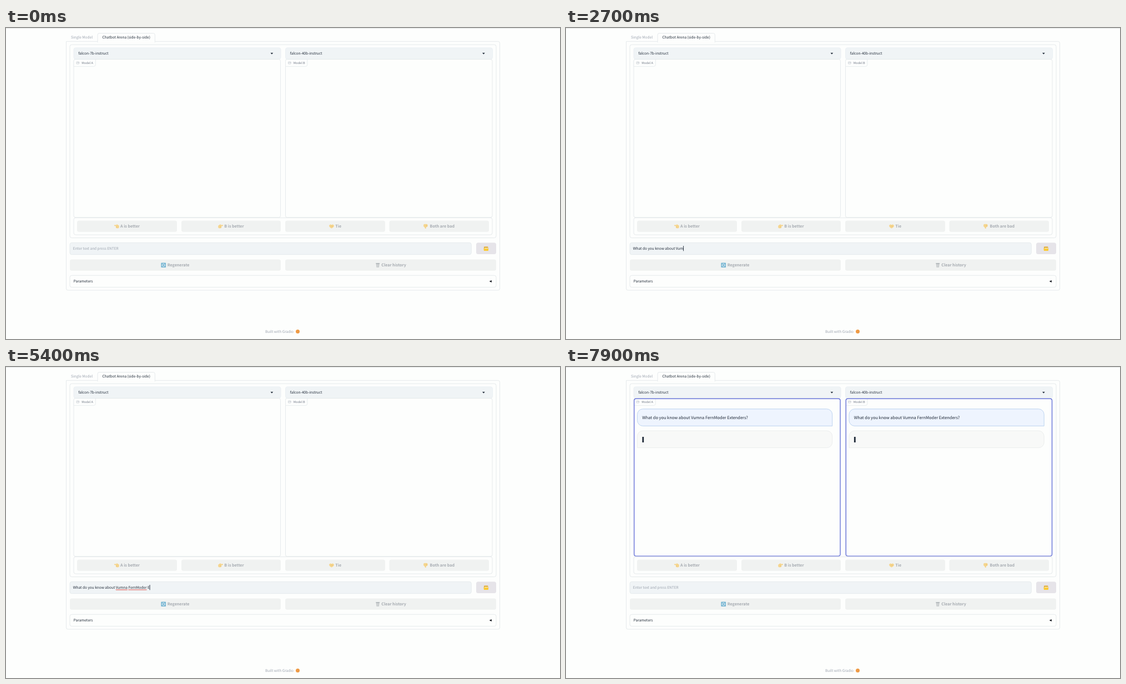
These frames come from a looping animation (998 by 561 pixels, 8 s). An HTML page with a canvas:

```html
<!DOCTYPE html>
<html lang="en">
<head>
<meta charset="utf-8">
<title>Model comparison chat</title>
<style>
html, body { margin: 0; width: 100%; height: 100%; overflow: hidden; background: #fdfefd; }
canvas { display: block; width: 998px; height: 561px; }
</style>
</head>
<body>
<canvas id="stage"></canvas>
<script>
const W = 998, H = 561, LOOP = 8000;
const SUBMIT = 6700, REPLY = 7800, ETA = 1.3;
const SANS = '"Noto Sans CJK JP", "Noto Sans CJK SC", "Noto Sans", sans-serif';
const MONO = '"Liberation Mono", monospace';
const INK = '#1f2937', MUTED = '#9ca3af', LINE = '#e6eaec', FIELD = '#f0f4f6', PAGE = '#fdfefd';
const BLUE = '#5663d8', GOLD = '#f5d58e';
const QUESTION = 'What do you know about Vumna FernModer Extenders?';
const COLUMN = 381.5;

// [time, characters typed]
const KEYS = [[200, 1], [1200, 17], [1500, 17], [2700, 26], [4200, 40], [5700, 40], [6400, QUESTION.length]];

const canvas = document.getElementById('stage');
const dpr = window.devicePixelRatio || 1;
canvas.width = W * dpr;
canvas.height = H * dpr;
const ctx = canvas.getContext('2d');

function box(x, y, x2, y2, radius, fill, stroke, width = 1) {
  ctx.beginPath();
  ctx.roundRect(x, y, x2 - x, y2 - y, radius);
  if (fill) { ctx.fillStyle = fill; ctx.fill(); }
  if (stroke) { ctx.strokeStyle = stroke; ctx.lineWidth = width; ctx.stroke(); }
}

function poly(color, ...pts) {
  ctx.beginPath();
  for (let i = 0; i < pts.length; i += 2) ctx.lineTo(pts[i], pts[i + 1]);
  ctx.closePath();
  ctx.fillStyle = color;
  ctx.fill();
}

function dot(x, y, r, color) {
  ctx.beginPath();
  ctx.arc(x, y, r, 0, Math.PI * 2);
  ctx.fillStyle = color;
  ctx.fill();
}

function setFont(size, weight = 400, family = SANS) {
  ctx.font = `${weight} ${size}px ${family}`;
  ctx.textRendering = 'geometricPrecision';
}

// cy is the middle of the capitals
function text(str, x, cy, color = INK, size = 6.52, weight = 400) {
  setFont(size, weight);
  ctx.textAlign = 'left';
  ctx.fillStyle = color;
  ctx.fillText(str, x, cy + size * 0.367);
}

function timer(str, right, cy) {
  setFont(6.25, 400, MONO);
  ctx.textAlign = 'right';
  ctx.fillStyle = '#4b5260';
  ctx.fillText(str, right, cy + 2.1);
}

function at(x, y, draw, flip = 1) {
  ctx.save();
  ctx.translate(x, y);
  ctx.scale(flip, 1);
  draw();
  ctx.restore();
}

function hand() {
  box(-4.2, -2.2, 1.6, 3.6, 1.8, GOLD);
  box(-2, -2.4, 4.6, -0.5, 0.9, GOLD);
  poly(GOLD, -3.4, -1, -0.6, -3.8, 0.5, -3, -0.6, 0);
  ctx.fillStyle = '#e6bd70';
  for (const y of [0.2, 1.6]) ctx.fillRect(-0.8, y, 2.2, 0.4);
}

function thumbDown() {
  box(-3.8, -4, 3.4, 1.2, 1.6, GOLD);
  poly(GOLD, -2.8, 0, 1.2, 0, 0.6, 4, -0.8, 4.2);
  ctx.fillStyle = '#e6bd70';
  for (const y of [-2.6, -1.3, 0]) ctx.fillRect(0.6, y, 2.6, 0.4);
}

function handshake() {
  poly(GOLD, -4.5, -1.8, -2, -3.4, 0, -2.4, 2, -3.4, 4.5, -1.8, 3.8, 1, 0.6, 3.6, -0.8, 3.6, -3.8, 1);
  poly('#e8c178', -1.4, 0.6, 0.4, -1.4, 2.8, 0.8, 2.4, 1.2, 0.4, -0.5, -0.8, 1);
}

function refresh() {
  box(-4.4, -4.2, 4.4, 4.2, 1, '#7ab7d3');
  ctx.strokeStyle = '#f2f7f9';
  ctx.lineWidth = 0.9;
  for (const a of [0, Math.PI]) {
    ctx.beginPath();
    ctx.arc(0, 0, 2.3, a + 0.3, a + 2.6);
    ctx.stroke();
  }
  poly('#f2f7f9', 1, 0.4, 3.4, 0.4, 2.2, -1.4);
  poly('#f2f7f9', -1, -0.4, -3.4, -0.4, -2.2, 1.4);
}

function bin() {
  poly('#c3c7c9', -3, -2.6, 3, -2.6, 2.3, 4, -2.3, 4);
  box(-3.5, -3.8, 3.5, -2.4, 0.6, '#aeb3b6');
  ctx.fillStyle = '#e3e6e7';
  for (const x of [-1.5, 0, 1.5]) ctx.fillRect(x - 0.25, -1.6, 0.5, 4.6);
}

function folder() {
  box(-3.8, -3.6, 3.6, 3.6, 0.8, '#dfa41f');
  box(-3, -1.8, 3.4, 0.4, 0.3, '#f4efdc');
  poly('#fccb35', -4.5, -0.4, 4.5, -0.4, 3.8, 3.8, -3.8, 3.8);
}

function button(x, x2, y, label, labelX, iconX, icon, flip) {
  box(x, y, x2, y + 20.3, 3.5, '#f0f2f1');
  at(iconX, y + 10.3, icon, flip);
  text(label, labelX, y + 10.1, '#a6abb1', 7.1, 700);
}

function column(index, model) {
  const x = 122 + index * COLUMN;
  box(x, 35.7, x + 373, 56.2, 3.5, FIELD, '#e8eef1', 0.8);
  text(model, x + 8.3, 45.8);
  poly(INK, x + 354.5, 44.8, x + 359.3, 44.8, x + 356.9, 47.4);
  box(x, 56.5, x + 372.5, 341.7, 3, PAGE, LINE);
}

function modelTag(index) {
  const x = 122 + index * COLUMN;
  box(x, 56.5, x + 39.3, 69.3, [3, 0, 3, 0], PAGE, LINE, 0.9);
  box(x + 5, 61, x + 9.6, 64.8, 0.6, null, '#b3b9c2', 0.6);
  ctx.fillStyle = '#b3b9c2';
  ctx.fillRect(x + 6, 62.4, 3.8, 0.6);
  text('Model ' + 'AB'[index], x + 14.3, 62.9, '#6f7785', 5.55);
}

function layout() {
  ctx.fillStyle = PAGE;
  ctx.fillRect(0, 0, W, H);
  ctx.fillStyle = '#e3e6e5';
  ctx.fillRect(0, 0, W, 1);

  box(108.5, 24.3, 889.5, 473, [0, 3, 3, 3], null, LINE);
  box(165, 9.5, 268.3, 26, [3, 3, 0, 0], PAGE, LINE);
  ctx.fillStyle = PAGE;
  ctx.fillRect(165.5, 24.9, 102.3, 2);
  text('Single Model', 117, 16.7, MUTED);
  text('Chatbot Arena (side-by-side)', 173.5, 16.7);

  box(115, 30, 883, 378.5, 3.5, null, LINE);
  column(0, 'falcon-7b-instruct');
  column(1, 'falcon-40b-instruct');

  box(122, 342.3, 876, 373, 3.5, null, LINE);
  button(128, 308, 347.4, 'A is better', 206, 199.5, hand, -1);
  button(316, 495, 347.4, 'B is better', 393.3, 386.5, hand);
  button(503, 683, 347.4, 'Tie', 593.3, 586.5, handshake);
  button(690.5, 870, 347.4, 'Both are bad', 763.6, 756, thumbDown);

  box(847, 387.3, 883, 408, 3.5, '#e6e4e9');
  at(864.8, 398.2, folder);
  button(115, 495, 417.5, 'Regenerate', 290.8, 283.7, refresh);
  button(503, 883, 417.5, 'Clear history', 676.3, 669.7, bin);

  box(115, 446.3, 883, 467.7, 3.5, null, LINE);
  text('Parameters', 121.8, 456.8);
  poly('#11151c', 870.6, 457, 874.8, 454.9, 874.8, 459.1);

  text('Built with Gradio', 467, 547.2, MUTED);
  dot(525.5, 547.5, 3.5, '#ee9a45');
}

function typedCount(t) {
  if (t < KEYS[0][0]) return 0;
  for (let i = 1; i < KEYS.length; i++) {
    const [t0, n0] = KEYS[i - 1], [t1, n1] = KEYS[i];
    if (t < t1) return Math.floor(n0 + (n1 - n0) * (t - t0) / (t1 - t0));
  }
  return QUESTION.length;
}

function squiggle(x, x2) {
  ctx.beginPath();
  for (let i = 0; x + i <= x2; i++) ctx.lineTo(x + i, 401.9 + (i % 2 ? 0.7 : -0.7));
  ctx.strokeStyle = '#e0443c';
  ctx.lineWidth = 0.8;
  ctx.stroke();
}

function inputField(t) {
  box(115, 387.3, 838.3, 408.7, 3.5, FIELD, '#e5eaed', 0.9);
  const count = t < SUBMIT ? typedCount(t) : 0;
  if (!count) {
    text('Enter text and press ENTER', 120.8, 397.5, MUTED);
    return;
  }
  text(QUESTION.slice(0, count), 120.8, 397.5);
  const edge = n => 120.8 + ctx.measureText(QUESTION.slice(0, n)).width;
  for (const [from, to] of [[23, 28], [29, 38]]) {
    if (count > to) squiggle(edge(from), edge(to));
  }
  const resting = t >= 4700 && t < 5200;
  if (!resting) {
    ctx.fillStyle = INK;
    ctx.fillRect(edge(count) - 0.2, 393, 0.9, 9.3);
  }
}

function loading(t) {
  const age = (t - SUBMIT) / 1000;
  const clock = `${(0.3 + Math.floor(age * 10 + 0.001) / 10).toFixed(1)}/${ETA}s`;
  for (let i = 0; i < 2; i++) {
    const x = 122 + i * COLUMN;
    timer(clock, x + 368, 62.9);
    box(x + 10.5, 75.5, x + 362, 106.3, 10, '#f9faf9', '#eceeed', 0.9);
    for (let k = 0; k < 3; k++) {
      const phase = Math.max(0, age + 0.25 - k * 0.33) % 1;
      ctx.globalAlpha = 0.4 + 0.6 * Math.abs(1 - 2 * phase);
      dot(x + 177.8 + k * 6.7, 90.8, 1.3, '#11151c');
    }
    ctx.globalAlpha = 1;
  }
  box(115, 387.3, 838.3, 408.7, 3.5, PAGE, LINE);
  const progress = Math.min(1, 0.184 + age / ETA);
  box(115.5, 387.8, 115 + 723 * progress, 408.2, [3, 0, 0, 3], '#f7f9f8');
  dot(476, 397.5, 4, BLUE);
  timer(clock, 833.8, 393.8);
}

function replies() {
  for (let i = 0; i < 2; i++) {
    const x = 122 + i * COLUMN;
    box(x + 6.5, 75.7, x + 357.7, 106.4, [10, 10, 0, 10], '#eef4fe', '#b8d1f0', 0.9);
    text(QUESTION, x + 15.2, 91, INK, 7.45);
    box(x + 6.5, 115, x + 357.7, 145.7, [10, 10, 10, 0], '#f8f9f8', '#eaedec', 0.9);
    ctx.fillStyle = INK;
    ctx.fillRect(x + 15.4, 126, 2.8, 10);
    box(x + 0.8, 57.2, x + 372, 341, 3.5, null, BLUE, 1.2);
  }
}

function draw(t) {
  ctx.setTransform(dpr, 0, 0, dpr, 0, 0);
  layout();
  modelTag(0);
  modelTag(1);
  if (t >= SUBMIT && t < REPLY) loading(t);
  else inputField(t);
  if (t >= REPLY) replies();
}

const start = performance.now();
function tick() {
  draw((performance.now() - start) % LOOP);
  requestAnimationFrame(tick);
}
tick();
</script>
</body>
</html>
```
